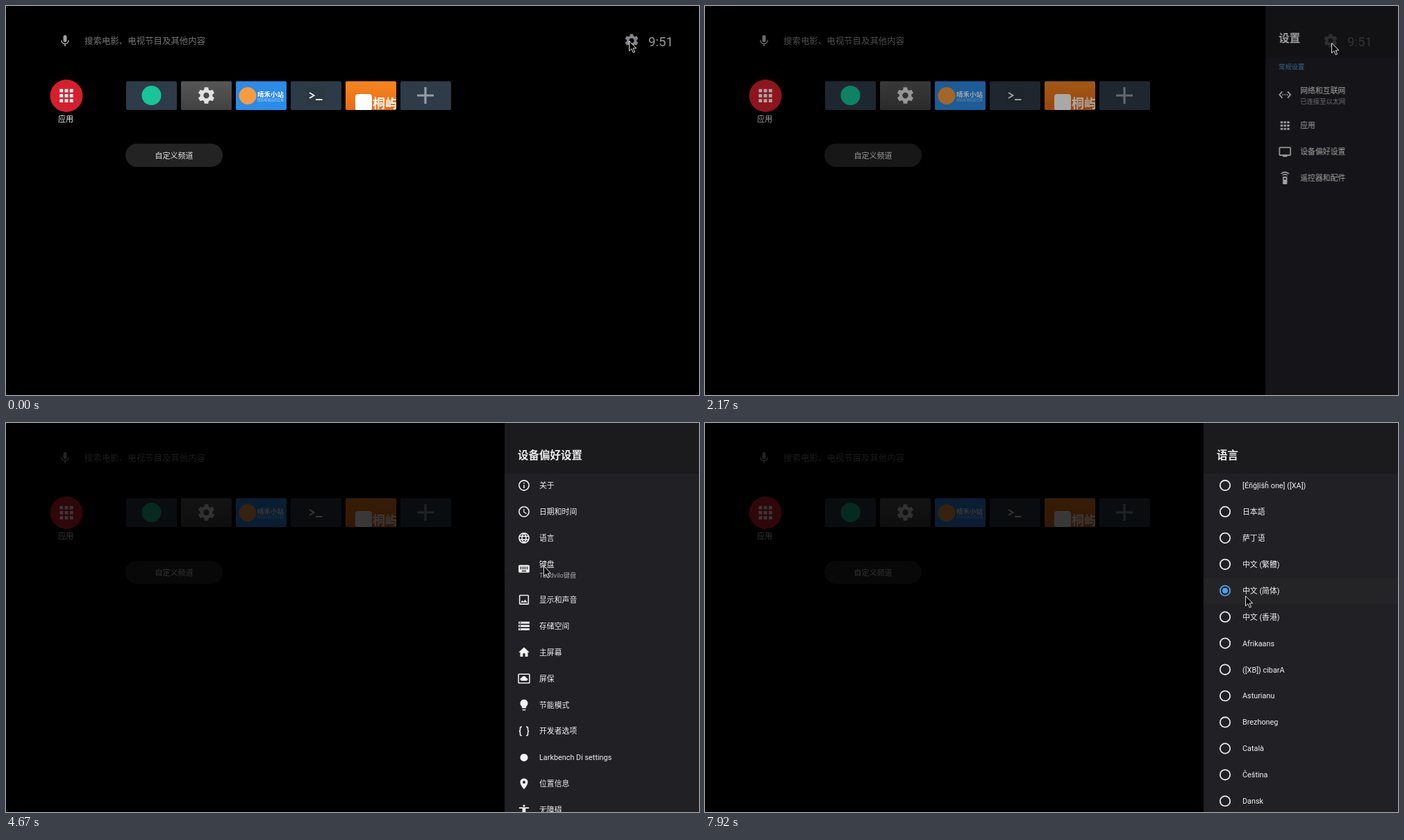
These frames come from a looping animation (998 by 561 pixels, 8000 ms). An HTML page:

```html
<!DOCTYPE html>
<html lang="zh-CN">
<head>
<meta charset="utf-8">
<style>
html, body { margin: 0; width: 100%; height: 100%; overflow: hidden; background: #000; }
svg { display: block; width: 998px; height: 561px; font-family: Roboto, "Noto Sans CJK SC", "Noto Sans CJK", sans-serif; }
path { fill-rule: evenodd; }
</style>
</head>
<body>
<svg id="stage" viewBox="0 0 998 561"></svg>
<script>
const squares = [4, 10, 16].flatMap(y => [4, 10, 16].map(x => `M${x} ${y}h4v4h-4z`)).join('');

const polar = (radius, degrees) => {
  const a = degrees * Math.PI / 180;
  return `${(12 + radius * Math.cos(a)).toFixed(2)} ${(12 + radius * Math.sin(a)).toFixed(2)}`;
};
const gear = 'M' + [30, 90, 150, 210, 270, 330].flatMap(a =>
  [polar(7.3, a - 22), polar(10, a - 13), polar(10, a + 13), polar(7.3, a + 22)]).join('L') +
  'zM12 8.5a3.5 3.5 0 1 0 0 7a3.5 3.5 0 0 0 0-7z';

const ICONS = {
  gear,
  apps: squares,
  mic: 'M12 14a3 3 0 0 0 3-3V5a3 3 0 0 0-6 0v6a3 3 0 0 0 3 3zM17.3 11c0 3-2.5 5.1-5.3 5.1S6.7 14 6.7 11H5c0 3.4 2.7 6.2 6 6.7V21h2v-3.3c3.3-.5 6-3.3 6-6.7z',
  network: 'M7.8 6.8L6.2 5.5.8 12l5.4 6.5 1.6-1.3L3.4 12zM7 11h2v2H7zM11 11h2v2h-2zM15 11h2v2h-2zM17.8 5.5l-1.6 1.3 4.4 5.2-4.4 5.2 1.6 1.3 5.4-6.5z',
  tv: 'M21 3H3a2 2 0 0 0-2 2v12a2 2 0 0 0 2 2h5v2h8v-2h5a2 2 0 0 0 2-2V5a2 2 0 0 0-2-2zM21 17H3V5h18z',
  remote: 'M15 9H9a1 1 0 0 0-1 1v12a1 1 0 0 0 1 1h6a1 1 0 0 0 1-1V10a1 1 0 0 0-1-1zM12 15a2 2 0 1 1 0-4 2 2 0 0 1 0 4zM7 6l1.4 1.4a5 5 0 0 1 7.2 0L17 6a7 7 0 0 0-10 0zM4.2 3.2l1.4 1.4a9 9 0 0 1 12.8 0l1.4-1.4a11 11 0 0 0-15.6 0z',
  info: 'M12 2a10 10 0 1 0 0 20a10 10 0 0 0 0-20zM12 20a8 8 0 1 1 0-16a8 8 0 0 1 0 16zM11 7h2v2h-2zM11 11h2v6h-2z',
  clock: 'M12 2a10 10 0 1 0 0 20a10 10 0 0 0 0-20zM12 20a8 8 0 1 1 0-16a8 8 0 0 1 0 16zM12.5 7H11v6l5.2 3.1.8-1.2-4.5-2.7z',
  keyboard: 'M20 5H4a2 2 0 0 0-2 2v10a2 2 0 0 0 2 2h16a2 2 0 0 0 2-2V7a2 2 0 0 0-2-2zM8 15h8v2H8z' +
    [8, 11].flatMap(y => [5, 8, 11, 14, 17].map(x => `M${x} ${y}h2v2h-2z`)).join(''),
  picture: 'M19 3H5a2 2 0 0 0-2 2v14a2 2 0 0 0 2 2h14a2 2 0 0 0 2-2V5a2 2 0 0 0-2-2zM19 19H5V5h14zM14.1 11.9l-3 3.8L9 13.1 6 17h12z',
  storage: [4, 10, 16].map(y => `M2 ${y}h20v4H2zM4 ${y + 1}h2v2H4z`).join(''),
  home: 'M10 20v-6h4v6h5v-8h3L12 3 2 12h3v8z',
  saver: 'M21 3H3a2 2 0 0 0-2 2v14a2 2 0 0 0 2 2h18a2 2 0 0 0 2-2V5a2 2 0 0 0-2-2zM21 19H3V5h18zM8 16a3 3 0 0 1 0-6a4.2 4.2 0 0 1 8 1a2.5 2.5 0 0 1 .5 5z',
  bulb: 'M9 20h6v1a1 1 0 0 1-1 1h-4a1 1 0 0 1-1-1zM12 2a7 7 0 0 0-4 12.7V17a1 1 0 0 0 1 1h6a1 1 0 0 0 1-1v-2.3A7 7 0 0 0 12 2z',
  place: 'M12 2a7 7 0 0 0-7 7c0 5.2 7 13 7 13s7-7.8 7-13a7 7 0 0 0-7-7zM12 11.5a2.5 2.5 0 1 1 0-5a2.5 2.5 0 0 1 0 5z',
  person: 'M12 2a2 2 0 1 1 0 4a2 2 0 0 1 0-4zM21 9h-6v13h-2v-6h-2v6H9V9H3V7h18z',
  dot: 'M12 5a7 7 0 1 0 0 14a7 7 0 0 0 0-14z'
};
const LINE_ICONS = {
  globe: 'M12 3a9 9 0 1 0 0 18a9 9 0 0 0 0-18c-5 5-5 13 0 18c5-5 5-13 0-18M4 9h16M4 15h16',
  braces: 'M8 4q-3 0-3 3v2q0 3-2 3q2 0 2 3v2q0 3 3 3M16 4q3 0 3 3v2q0 3 2 3q-2 0-2 3v2q0 3-3 3'
};

const text = (x, y, size, fill, str, extra = '') =>
  `<text x="${x}" y="${y}" font-size="${size}" fill="${fill}" ${extra}>${str}</text>`;
const rect = (x, y, w, h, fill, extra = '') =>
  `<rect x="${x}" y="${y}" width="${w}" height="${h}" fill="${fill}" ${extra}/>`;
const circle = (x, y, r, fill, extra = '') =>
  `<circle cx="${x}" cy="${y}" r="${r}" fill="${fill}" ${extra}/>`;
const icon = (name, x, y, size, color) => {
  const paint = ICONS[name] ? `fill="${color}"` : `fill="none" stroke="${color}" stroke-width="2"`;
  return `<path d="${ICONS[name] || LINE_ICONS[name]}" ${paint} transform="translate(${x} ${y}) scale(${size / 24}) translate(-12 -12)"/>`;
};
const middle = 'text-anchor="middle"', bold = 'font-weight="700"';

const tileColors = ['#2e3b48', 'url(#grey)', '#2b8be8', '#2d3a47', 'url(#orange)', '#2e3b48'];
const home =
  icon('mic', 85, 50.4, 20, '#a0a0a0') +
  text(113, 55, 12.45, '#757575', '搜索电影、电视节目及其他内容') +
  icon('gear', 901, 50, 23.5, '#85858d') +
  text(925, 58, 18.6, '#989898', '9:51') +
  circle(87, 129.5, 23.4, '#d81e2c') + icon('apps', 87, 129.3, 29, '#fff') +
  text(86, 167.4, 11, '#eee', '应用', middle) +
  tileColors.map((c, i) => rect(173 + 79 * i, 108.5, 73, 41.5, c, 'rx="2"')).join('') +
  circle(209.5, 129, 14, '#17c596') +
  icon('gear', 288.5, 129, 29, '#e2e2e2') +
  circle(348, 129.5, 12.5, '#f59b40') +
  text(362, 131, 9.5, '#fff', '晴禾小站', bold) +
  text(362, 137, 4.8, '#a9d0f7', '精选电视应用合集') +
  rect(432, 117, 27, 25, '#2c3840', 'rx="4"') +
  '<path d="M437 125l6.5 4-6.5 4M446 135h9.5" fill="none" stroke="#f0f0f0" stroke-width="2"/>' +
  `<g clip-path="url(#tileClip)">${rect(503, 127, 24, 24, '#fff', 'rx="4"')}${text(528, 146.5, 18, '#fff', '桐屿', bold)}</g>` +
  '<path d="M592 129h24M604 117v24" stroke="#979da3" stroke-width="3.2"/>' +
  rect(172, 198.5, 140, 33.5, '#232323', 'rx="16.75"') +
  text(242, 219.8, 11, '#e4e4e4', '自定义频道', middle);

const ROW = 37.94, TALL_ROW = 51;

function makePage(title, top, items, heading = '') {
  let y = top;
  const rows = [];
  let body = text(737, 52, 15.5, '#eee', title, bold) + heading;
  for (const [label, iconName, sub] of items) {
    const h = sub ? TALL_ROW : ROW, cy = y + h / 2;
    rows.push({ y, h });
    if (iconName.startsWith('radio')) {
      const on = iconName === 'radio on', color = on ? '#4d9eea' : '#e8e8e8';
      body += circle(749, cy, 7.2, 'none', `stroke="${color}" stroke-width="1.8"`) + (on ? circle(749, cy, 4, color) : '');
      body += text(774, cy + 4, 10.85, '#f4f4f4', label);
    } else {
      body += icon(iconName, 746, cy, 19, '#f4f4f4') + text(768, cy + (sub ? -2.2 : 4), 10.85, '#f4f4f4', label);
      if (sub) body += text(768, cy + 12.5, 9.3, '#a6a6aa', sub);
    }
    y += h;
  }
  return { rows, body };
}

const languages = ['[Éñĝļîšĥ one] ([XA])', '日本語', '萨丁语', '中文 (繁體)', '中文 (简体)', '中文 (香港)', 'Afrikaans',
  '([XB]) cibarA', 'Asturianu', 'Brezhoneg', 'Català', 'Čeština', 'Dansk'];
const pages = [
  makePage('设置', 102.5, [
    ['网络和互联网', 'network', '已连接至以太网'], ['应用', 'apps'], ['设备偏好设置', 'tv'], ['遥控器和配件', 'remote']
  ], text(737, 91, 9.25, '#4d9edf', '常规设置')),
  makePage('设备偏好设置', 71, [
    ['关于', 'info'], ['日期和时间', 'clock'], ['语言', 'globe'], ['键盘', 'keyboard', 'Tandvilo键盘'],
    ['显示和声音', 'picture'], ['存储空间', 'storage'], ['主屏幕', 'home'], ['屏保', 'saver'], ['节能模式', 'bulb'],
    ['开发者选项', 'braces'], ['Larkbench Di settings', 'dot'], ['位置信息', 'place'], ['无障碍', 'person']
  ]),
  makePage('语言', 71, languages.map((name, i) => [name, i === 4 ? 'radio on' : 'radio']))
];

const stage = document.getElementById('stage');
stage.innerHTML = `<defs>
  <linearGradient id="grey" x2="0" y2="1"><stop stop-color="#575757"/><stop offset="1" stop-color="#414141"/></linearGradient>
  <linearGradient id="orange" x2="0" y2="1"><stop stop-color="#f5861f"/><stop offset="1" stop-color="#ea6a16"/></linearGradient>
  <clipPath id="tileClip">${rect(489, 108.5, 73, 41.5, '#000', 'rx="2"')}</clipPath>
  <clipPath id="panelClip">${rect(718, 0, 280, 561, '#000')}</clipPath></defs>
  ${home}${rect(0, 0, 998, 561, '#000', 'id="scrim"')}
  <g id="panel" clip-path="url(#panelClip)">
    ${rect(718, 0, 280, 561, '#202025')}${rect(718, 0, 280, 73, '#1b1b1e')}${rect(718, 0, 280, ROW, '#242427', 'id="focus"')}
    ${pages.map(p => `<g class="page">${p.body}</g>`).join('')}
  </g>
  <path id="cursor" d="M.5.5V14.8l3.3-3 2.5 5.4 2.2-1-2.4-5.3h4.6z" fill="#000" stroke="#e8e8e8"/>`;
const [scrim, panel, focus, cursor] = ['scrim', 'panel', 'focus', 'cursor'].map(id => document.getElementById(id));
const layers = [...document.querySelectorAll('.page')];

// time, x, y
const cursorPath = [
  [0, 897, 50], [200, 916, 22], [420, 900, 3], [580, 890, 0], [830, 886, 18], [1000, 891, 40], [1160, 897, 53],
  [1410, 897, 53], [1416, 902, 53], [2580, 902, 53], [2667, 861, 61], [3000, 838, 110], [3417, 806, 182],
  [3750, 776, 203], [3833, 774, 206], [4840, 774, 206], [5250, 790, 284], [5667, 785, 165], [7170, 785, 165],
  [7750, 773, 249], [7910, 773, 249], [7916, 778, 249], [8000, 778, 249]
];
const OPEN = 1975, SWITCHES = [4170, 6583];
const HOVERS = [[2750, SWITCHES[0], 0], [4910, SWITCHES[1], 1], [7245, 8000, 2]];

const progress = (t, start, duration) => Math.min(1, Math.max(0, (t - start) / duration));
const decelerate = p => 1 - (1 - p) ** 2;

function cursorAt(t) {
  const i = cursorPath.findIndex(k => k[0] > t);
  const [t0, x0, y0] = cursorPath[i - 1], [t1, x1, y1] = cursorPath[i];
  const p = (t - t0) / (t1 - t0);
  return [x0 + (x1 - x0) * p, y0 + (y1 - y0) * p];
}

function draw(t) {
  const open = progress(t, OPEN, 440), slide = decelerate(open);
  scrim.setAttribute('opacity', 0.78 * open);
  panel.setAttribute('opacity', slide);
  panel.setAttribute('transform', `translate(${280 * (1 - slide)} 0)`);

  layers.forEach((layer, i) => {
    const enter = i ? progress(t, SWITCHES[i - 1], 500) : 1;
    const leave = i < SWITCHES.length ? progress(t, SWITCHES[i], 500) : 0;
    layer.setAttribute('opacity', enter * (1 - leave));
    layer.setAttribute('transform', `translate(${70 * (1 - decelerate(enter) - decelerate(leave))} 0)`);
  });

  const [x, y] = cursorAt(t);
  cursor.setAttribute('transform', `translate(${x} ${y})`);
  const hover = HOVERS.find(([from, to]) => t >= from && t < to);
  const row = hover && pages[hover[2]].rows.find(r => y >= r.y && y < r.y + r.h);
  focus.setAttribute('opacity', row ? 1 : 0);
  if (row) {
    focus.setAttribute('y', row.y);
    focus.setAttribute('height', row.h);
  }
}

function tick(now) {
  draw(Math.floor(((now + 5) % 8000) * 0.012) / 0.012);
  requestAnimationFrame(tick);
}
requestAnimationFrame(tick);
</script>
</body>
</html>
```
